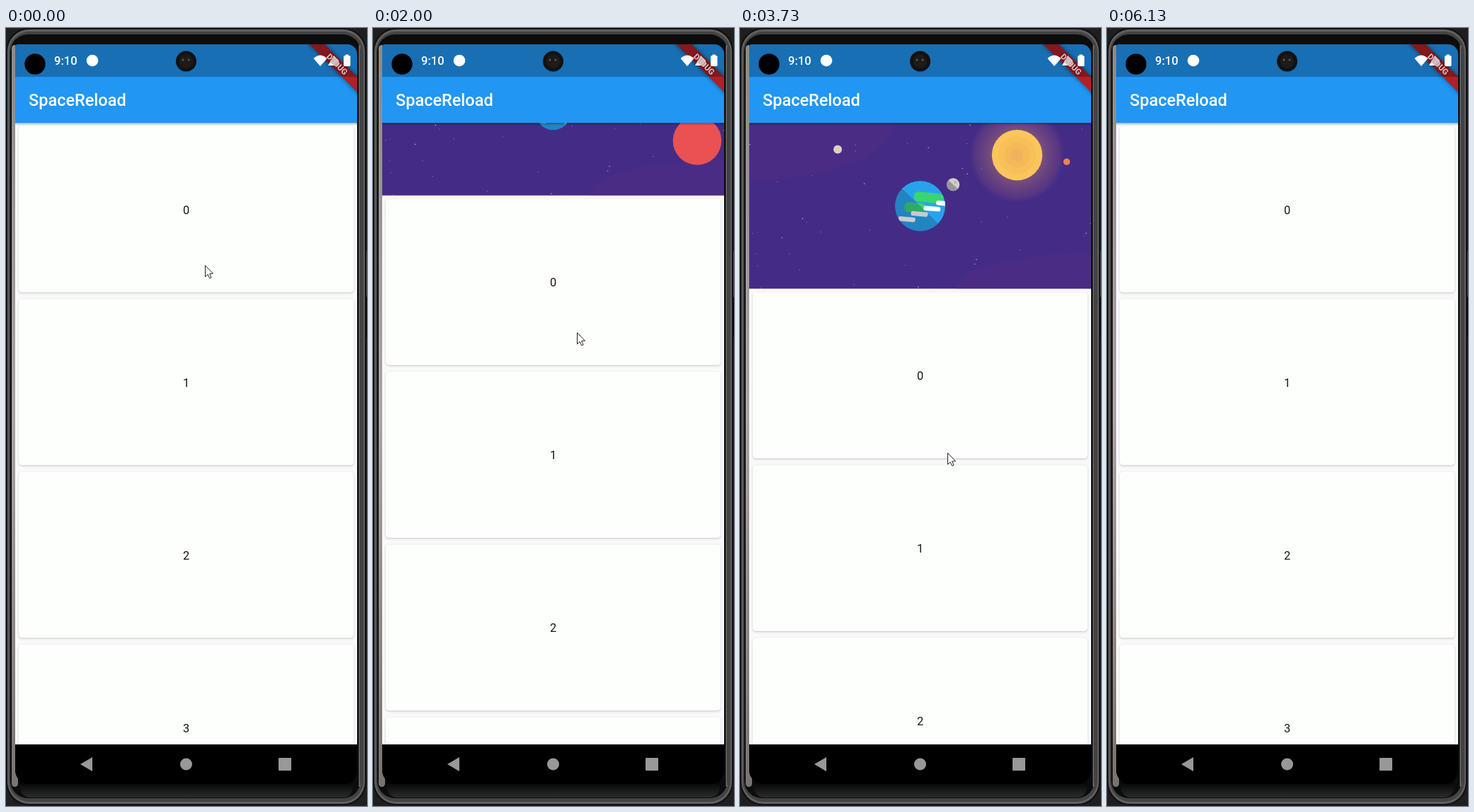
An HTML page with a canvas for the animation above (6.19 s loop, 510x1099 px).

```html
<!DOCTYPE html>
<html lang="en">
<head>
<meta charset="utf-8">
<title>SpaceReload</title>
<style>
html, body { margin: 0; width: 100%; height: 100%; overflow: hidden; background: #1f1f1f; }
canvas { display: block; }
</style>
</head>
<body>
<canvas id="stage" width="510" height="1099"></canvas>
<script>
const c = document.getElementById('stage').getContext('2d');
const LOOP = 6190, STEPS = 93, TAU = Math.PI * 2;
const LEFT = 13, WIDTH = 483;           // phone screen
const HEADER = 134, LIST_END = 1012;
const FULL = 234.5;                     // height of the opened header
const LOAD = 3600, LOAD_END = 5600, CLOSE = 460;

// Key points of the drag: [time, value]
const pull = [[520, 0], [1070, 21], [2000, 103], [2800, 209.5], [3350, FULL]];
const pointerY = [[0, 335], [1070, 365], [2000, 430], [2800, 495], [4200, 654]];

const clamp = (v, a, b) => Math.min(b, Math.max(a, v));
const smooth = k => k * k * (3 - 2 * k);

function keyed(keys, t) {
  const n = keys.findIndex(k => k[0] > t);
  if (n === 0) return keys[0][1];
  if (n < 0) return keys[keys.length - 1][1];
  const [t0, v0] = keys[n - 1], [t1, v1] = keys[n];
  return v0 + (v1 - v0) * (t - t0) / (t1 - t0);
}

function seeded(seed) {
  return () => (seed = seed * 16807 % 2147483647) / 2147483647;
}

function box(x, y, w, h, r, fill) {
  c.fillStyle = fill;
  c.beginPath();
  c.roundRect(x, y, w, h, r);
  c.fill();
}

function disc(x, y, r, fill, from = 0, to = TAU) {
  c.fillStyle = fill;
  c.beginPath();
  c.arc(x, y, r, from, to);
  c.fill();
}

function poly(points, fill) {
  c.fillStyle = fill;
  c.beginPath();
  points.forEach(([x, y]) => c.lineTo(x, y));
  c.closePath();
  c.fill();
}

function label(text, x, y, font, fill, align = 'left') {
  c.font = font + ' Roboto, sans-serif';
  c.textAlign = align;
  c.fillStyle = fill;
  c.fillText(text, x, y);
}

function fade(y0, y1, ...colors) {
  const g = c.createLinearGradient(0, y0, 0, y1);
  colors.forEach((color, i) => g.addColorStop(i / (colors.length - 1), color));
  return g;
}

function drawPhone() {
  box(0, 0, 510, 1099, 0, '#1f1f1f');
  box(506, 315, 4, 65, 1, '#4a4a4a');
  box(506, 380, 4, 57, 1, '#080808');
  box(0, 0, 509, 1098, 32, '#111');
  box(2, 2, 505, 1094, 31, '#606060');
  box(4, 5, 501, 1088, 29, '#434343');
  box(6, 9, 495, 1079, 25, '#0c0c0c');
  box(8, 24, 9, 1048, 8, fade(24, 1072, '#8d8a8a', '#aaa4a5', '#77736f'));
  box(498.5, 24, 2, 1048, 1, '#6f6f6f');
  box(20, 1062, 470, 25, [0, 0, 14, 14], fade(1066, 1087, '#050605', '#2a2d2b'));
  box(LEFT, 23, WIDTH, 1045, [4, 14, 20, 20], '#000');
}

function drawStatusIcons() {
  label('9:10', 68, 52, '500 16.5px', '#fff');
  disc(122, 46, 8.3, '#fff');
  c.beginPath();
  c.moveTo(444, 54);
  c.lineTo(434.5, 43);
  c.quadraticCurveTo(444, 34, 453.5, 43);
  c.fill();
  poly([[455, 53], [470, 53], [470, 46], [463, 39]], '#fff');
  box(477, 39, 9.5, 15, 1.5, '#fff');
  box(479.5, 37.5, 4.5, 3, 0, '#fff');
}

function drawBanner(paint) {
  c.save();
  c.beginPath();
  c.roundRect(LEFT, 23, WIDTH, 111, [4, 14, 0, 0]);
  c.clip();
  c.translate(LEFT + WIDTH, 23);
  c.rotate(Math.PI / 4);
  c.shadowColor = 'rgba(0,0,0,.55)';
  paint();
  c.restore();
}

function drawBars() {
  box(LEFT, HEADER, WIDTH, 4, 0, fade(HEADER, HEADER + 4, 'rgba(0,0,0,.26)', 'rgba(0,0,0,0)'));
  box(LEFT, 23, WIDTH, 111, [4, 14, 0, 0], '#2196f3');
  label('SpaceReload', 32, 110, '500 23.5px', '#fff');
  drawBanner(() => {
    c.shadowBlur = 6;
    box(-70, 32.5, 140, 15, 0, '#b02029');
  });
  box(LEFT, 23, WIDTH, 46, [4, 14, 0, 0], 'rgba(0,0,0,.26)');
  drawStatusIcons();
  drawBanner(() => {
    c.shadowBlur = 3;
    label('DEBUG', 0, 44, '900 11.5px', '#e2b4b8', 'center');
  });

  disc(41, 51, 14.7, '#000');
  disc(254.5, 47, 14.5, '#111');
  disc(254.5, 47, 10, '#1d1b1a');
  for (const x of [250, 258]) disc(x, 45, 1.5, '#5d5955');

  box(LEFT, LIST_END, WIDTH, 56, [0, 0, 20, 20], '#000');
  poly([[105, 1040], [122, 1030], [122, 1050]], '#989898');
  disc(254.5, 1040, 8.5, '#989898');
  box(385, 1031, 18, 18, 1, '#989898');
}

function drawList(offset) {
  box(LEFT, HEADER, WIDTH, LIST_END - HEADER, 0, '#f8f9f8');
  for (let i = 0; i < 4; i++) {
    const y = 139 + offset + i * 244;
    c.shadowColor = 'rgba(0,0,0,.22)';
    c.shadowBlur = 2.5;
    c.shadowOffsetY = 1;
    box(18, y, 473, 234.5, 4.5, '#fdfffd');
    c.shadowColor = 'transparent';
    label(i, 254.5, y + 123.7, '400 16.4px', '#151515', 'center');
  }
}

function drawEarth(scale, spin) {
  c.save();
  c.translate(254.5, 251.5);
  c.scale(scale, scale);
  disc(0, 0, 35.5, '#29a2ed');
  c.clip();
  c.rotate(0.09);
  // Bars drift to the right and wrap around the globe
  const bar = (x, y, w, h, fill) => {
    const at = (x + spin + 135) % 90 - 45;
    for (const dx of [0, -90]) box(at + dx, y, w, h, h / 2.4, fill);
  };
  for (let i = 0; i < 3; i++) bar(-18 - 12 * i * i, -20 + 16 * i, 42 - 11 * i, 14, '#39d474');
  for (let i = 0; i < 4; i++) bar(14 - 17 * i, -10 + 9 * i, 24, 6.5, '#fff');
  disc(0, 0, 37, 'rgba(20,40,55,.24)', 0.68, 0.68 + Math.PI);
  c.restore();
}

function drawMoon(angle) {
  const along = 3.5 + 55 * Math.cos(angle), across = 4 * Math.sin(angle);
  const x = 254.5 + along * 0.825 + across * 0.565;
  const y = 251.5 - along * 0.565 + across * 0.825;
  const r = 9.8 - 0.8 * Math.cos(angle);
  disc(x, y, r, '#d0cdcb');
  disc(x, y, r, '#99969a', 0.75, 0.75 + Math.PI);
  disc(x + 3, y - 3, 1.8, '#b5b1b0');
}

function drawSun(scale) {
  c.save();
  c.translate(391.5, 179.5);
  c.scale(scale, scale);
  const glow = c.createRadialGradient(0, 0, 30, 0, 0, 67);
  glow.addColorStop(0, 'rgba(235,160,100,.36)');
  glow.addColorStop(0.8, 'rgba(220,130,110,.12)');
  glow.addColorStop(1, 'rgba(200,110,120,0)');
  disc(0, 0, 67, glow);
  ['#fac65c', '#f8c058', '#f5b957', '#f2b15c'].forEach((color, i) => disc(0, 0, 35.7 - i * 9, color));
  c.restore();
}

// A planet that recedes to its resting place as `near` goes from 1 to 0
function drawPlanet(near, x, y, r, far, close) {
  disc(x, y, r, near > 0.02 ? close : far);
}

function drawStars() {
  const random = seeded(77);
  for (let i = 0; i < 40; i++) {
    box(LEFT + random() * WIDTH, HEADER + random() * FULL, 1.2, 1.2, 0, i % 3 ? '#7d6cae' : '#c9c1e0');
  }
}

function drawSpace(offset, t) {
  const p = t > LOAD ? 1 : offset / FULL;
  const scale = 1 - (1 - p) ** 2;
  const near = clamp(1 - p / 0.85, 0, 1) ** 2;
  const loaded = clamp(t - LOAD, 0, LOAD_END - LOAD);
  const angle = TAU * loaded / 2450;
  const moonBehind = Math.sin(angle) < 0;

  c.save();
  c.beginPath();
  c.rect(LEFT, HEADER, WIDTH, offset);
  c.clip();
  c.translate(0, offset - FULL);
  box(LEFT, HEADER, WIDTH, FULL, 0, '#442c86');
  c.fillStyle = 'rgba(90,45,130,.28)';
  c.beginPath();
  c.ellipse(13, 134, 205, 80, 0, 0, TAU);
  c.ellipse(496, 368, 190, 50, 0, 0, TAU);
  c.fill();
  drawStars();
  drawSun(scale);
  if (moonBehind) drawMoon(angle);
  drawEarth(scale, loaded * 0.063);
  if (!moonBehind && p > 0.5) drawMoon(angle);
  drawPlanet(near, 138 - 37 * near, 171.5 + 169 * near, 6 + 120 * near, '#dfd0bd', '#e58f73');
  drawPlanet(near, 461.5 - 15 * near, 189 + 434 * near, 4.7 + 126 * near, '#ee8452', '#ea5152');
  c.restore();
}

function drawPointer(t) {
  if (t >= LOAD_END) return;
  const y = Math.round(keyed(pointerY, t));
  const x = Math.round(281 + 13 * Math.sqrt((y - 335) / 319));
  c.save();
  c.translate(x + 0.5, y + 0.5);
  poly([[0, 0], [0, 16], [3.6, 12.6], [6.2, 18], [8.6, 17], [6.2, 11.6], [11, 11.4]], '#fff');
  c.strokeStyle = '#222';
  c.stroke();
  c.restore();
}

function draw(t) {
  const closing = smooth(clamp((t - LOAD_END) / CLOSE, 0, 1));
  const offset = keyed(pull, t) * (1 - closing);
  drawPhone();
  c.save();
  c.beginPath();
  c.rect(LEFT, HEADER, WIDTH, LIST_END - HEADER);
  c.clip();
  drawList(offset);
  if (offset > 0) drawSpace(offset, t);
  c.restore();
  drawBars();
  drawPointer(t);
}

function tick() {
  const step = LOOP / STEPS;
  draw(Math.floor(performance.now() % LOOP / step) * step);
  requestAnimationFrame(tick);
}
tick();
</script>
</body>
</html>
```
